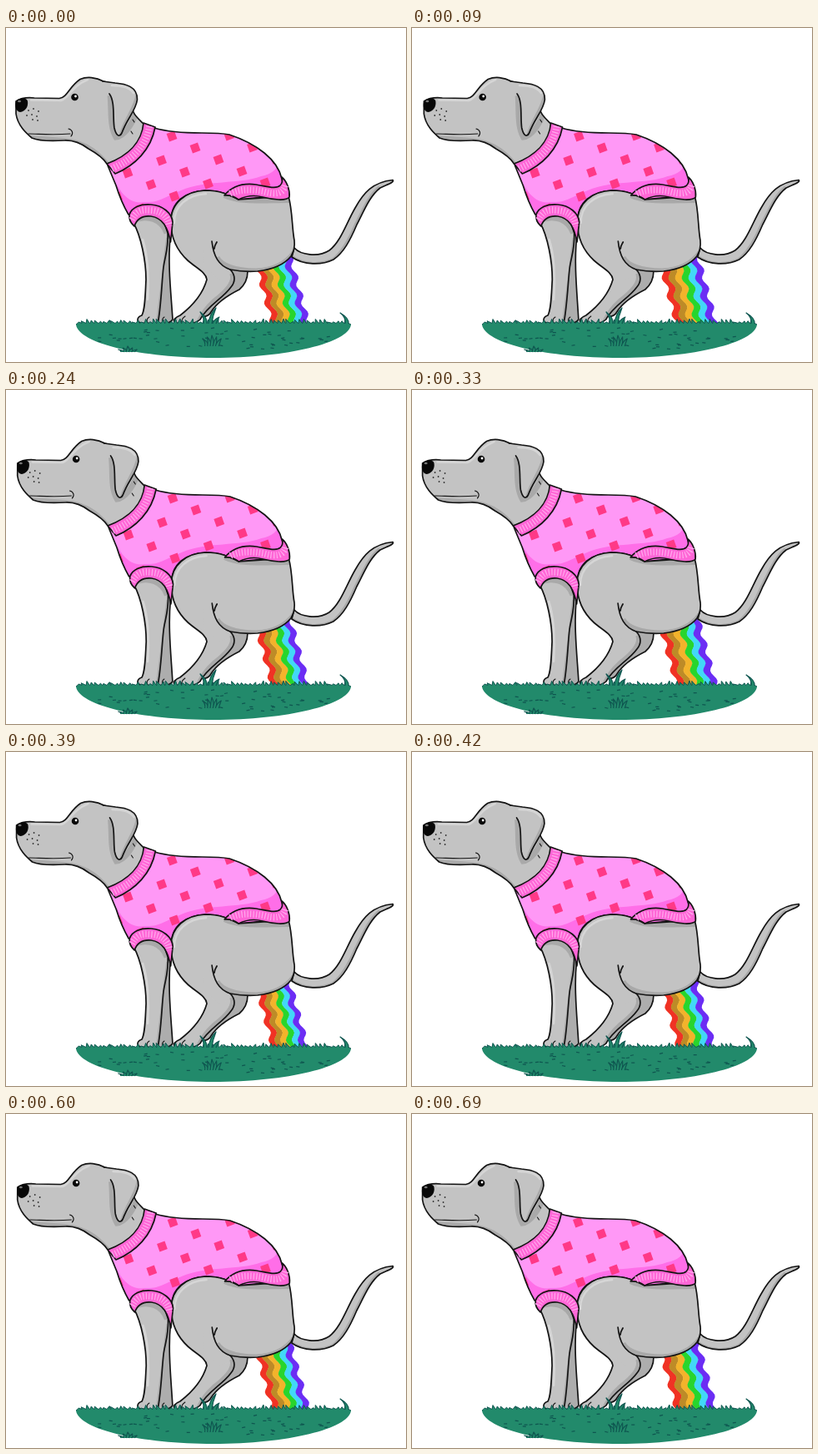
Recreate the animation shown at these times as an HTML page. Size 480 by 401 pixels, loop 720 ms.

```html
<!DOCTYPE html>
<html lang="en">
<head>
<meta charset="utf-8">
<title>Rainbow dog</title>
<style>
html, body { margin: 0; width: 100%; height: 100%; overflow: hidden; background: #fff; }
svg { display: block; width: 100vw; height: 100vh; }
.ink { stroke: #141414; stroke-width: 1.7; stroke-linecap: round; stroke-linejoin: round; }
.thin { stroke-width: 1.1; }
.line { fill: none; }
.fur { fill: #c3c3c3; }
.far { fill: #adadad; }
.shade { fill: none; stroke: #a9a9a9; }
.glow { fill: none; stroke: #d6d6d6; stroke-width: 2.5; stroke-linecap: round; }
.band { fill: #ff66d6; }
.rib { fill: none; stroke: #ffa9ee; stroke-width: 8; stroke-dasharray: 1.2 2.3; }
</style>
</head>
<body>
<svg viewBox="0 0 480 401" preserveAspectRatio="none">
  <defs>
    <path id="tail" d="M346 264C353 272 374 276 388 267C402 256 408 235 419 216C429 198 440 185 464 182.500C467 185 457 188 449 192C436 202 429 221 421 236C413 255 405 270 393 278C379 285 357 285 343 275Z"/>
    <path id="head" d="M12 88C18 84 25 83 34 84L64 84.500C74 83 75 71 89 61.500C97 58 108 59 117 64L140 70L153 101C155 106 160 110 165 115L166 140L130 172L121 163C116 155 108 150 99 145C91 139 82 134.500 70 135C54 136 38 135 31 132C24 126 14 117 12 103Z"/>
    <path id="ear" d="M124 79C131 88 128 108 130 120C132 129 136 132 139 126C145 109 156 99 157.500 86C158 70 143 67 131 66L116 64Z"/>
    <path id="leg" d="M153 234C162 250 168 280 168 302C167 321 167 338 163 345C157 347 156 353 162 354L182 355C186 338 187 303 189 287C191 273 195 265 194 246L188 228L160 222Z"/>
    <path id="haunch" d="M198 234C197 210 216 196 239 195C257 195 267 200 279 206L339 202C344 220 343 240 346 255C347 264 345 269 342 274C334 284 319 290 302 292C290 293 279 292 269 290C276 297 275 305 270 311C260 325 241 334 233 350C227 356 211 355 203 354C199 351 204 347 209 345C222 335 236 320 241 302C240 293 228 288 218 279C204 266 198 250 198 234Z"/>
    <path id="vest" d="M178 120C195 125 213 126 235 126C248 126 258 126 268 128C301 139 326 158 331 181L336 200L279 206C267 200 257 195 239 195C216 196 197 208 198 234L190 220L147 224C140 212 136 202 132 189L122 165C149 156 170 142 178 120Z"/>
    <clipPath id="tailClip"><use href="#tail"/></clipPath>
    <clipPath id="headClip"><use href="#head"/></clipPath>
    <clipPath id="earClip"><use href="#ear"/></clipPath>
    <clipPath id="legClip"><use href="#leg"/></clipPath>
    <clipPath id="haunchClip"><use href="#haunch"/></clipPath>
    <clipPath id="vestClip"><use href="#vest"/></clipPath>
  </defs>

  <g id="rainbow"></g>

  <g id="dog">
    <use href="#tail" class="fur"/>
    <g clip-path="url(#tailClip)">
      <path class="shade" stroke-width="6" d="M343 276C357 286 379 286 393 279C405 270 413 255 421 236C429 221 436 202 449 192"/>
    </g>
    <use href="#tail" class="ink line"/>

    <path class="ink far" d="M262 288L290 292C290 302 287 308 280 314C268 320 254 328 246 341C243 347 236 347 232 346L240 325Z"/>
    <path class="ink far" d="M188 228L197 252C194 284 198 318 200 350C197 355 187 355 180 354Z"/>

    <use href="#leg" class="fur"/>
    <g clip-path="url(#legClip)">
      <path class="shade" stroke-width="9" d="M152 230C170 222 188 229 194 246"/>
      <path class="shade" stroke-width="4" d="M194 252C190 285 187 315 182 354"/>
      <path class="glow" d="M164 254C170 272 172 300 170 326"/>
    </g>
    <use href="#leg" class="ink line"/>
    <path class="ink line thin" d="M170 354C168 350 170 348 172 347M188 354C187 350 188 348 190 347"/>

    <use href="#head" class="fur"/>
    <g clip-path="url(#headClip)">
      <path class="shade" stroke-width="8" d="M28 133L70 136C99 139 112 154 123 167"/>
      <path class="shade" stroke-width="7" d="M125 81C127 99 124 117 132 131C141 130 151 117 156 102"/>
      <path class="glow" d="M30 86.500L66 87C76 84 78 70 98 62"/>
    </g>
    <use href="#head" class="ink line"/>
    <use href="#ear" class="fur"/>
    <g clip-path="url(#earClip)">
      <path class="shade" stroke-width="7" d="M159 80C157 96 145 109 139 129"/>
      <path class="glow" d="M127 69C140 69 149 72 153 78"/>
    </g>
    <path class="ink line" d="M124 79C131 88 128 108 130 120C132 129 136 132 139 126C145 109 156 99 157.500 86C158 70 143 67 131 66L116 64"/>
    <path class="ink line thin" d="M27 127C39 127 54 129 77 127M75 121C80 122 81 127 78 130"/>
    <path class="ink line thin" d="M152 110L154 113M150 124L152 127"/>
    <path d="M12 88C16 83 25 83 26 88C27 95 23 100 17 101C12 100 10 94 12 88Z" fill="#080808"/>
    <ellipse cx="16" cy="88" rx="2" ry="1.200" fill="#777"/>
    <circle cx="82.500" cy="83" r="4.300" fill="#080808"/>
    <circle cx="83.500" cy="82" r="1.400" fill="#fff"/>
    <g id="freckles" fill="#333"></g>

    <use href="#vest" fill="#ff98f6"/>
    <g clip-path="url(#vestClip)">
      <path d="M124 172C137 199 148 212 166 209C184 210 190 203 210 195C240 182 280 188 306 178C322 175 329 166 325 157L345 205L190 240L135 230Z" fill="#ff6ee8"/>
      <g id="checks" fill="#ff3987"></g>
    </g>
    <use href="#vest" class="ink line"/>

    <use href="#haunch" class="fur"/>
    <g clip-path="url(#haunchClip)">
      <path class="shade" stroke-width="6" d="M262 201C280 210 310 207 340 207"/>
      <path class="shade" stroke-width="9" d="M252 276C257 286 274 293 300 293C322 292 337 284 347 270"/>
      <path class="shade" stroke-width="8" d="M272 294C277 306 264 318 250 329C240 338 236 345 232 354"/>
      <path class="glow" d="M202 234C201 214 218 200 240 199"/>
    </g>
    <path class="fur" d="M249 262C251 279 261 286 270 291C269 298 262 301 255 302L238 286L236 262Z"/>
    <use href="#haunch" class="ink line"/>
    <path class="ink line" d="M247 256C249 274 255 285 269 290M250 265C250 261 252 259 253 257"/>
    <path class="ink line thin" d="M211 354C210 350 212 348 215 346"/>

    <path class="ink band" d="M165 114L179 119C174 146 155 165 131 175L121 163C145 154 163 138 165 114Z"/>
    <path class="rib" d="M172 118C168 143 151 158 127 169"/>
    <path class="ink band" d="M148 224C151 215 162 211 174 212C188 213 199 222 200 233L197.500 257C194 239 188 228 174 226C164 225 157 229 154 238Q147 232 148 224Z"/>
    <path class="rib" d="M151 230C157 218 164 218 175 219C187 220 194 226 196 238"/>
    <path class="ink band" d="M262 201C272 189 285 186 300 188C313 190 324 194 329 189C332 186 332 183 331 179C336 183 341 193 340 203C336 208 320 206 308 203C297 200 287 202 279 206Q271 200 262 201Z"/>
    <path class="rib" d="M269 199C281 193 295 194 308 196C322 200 333 200 335 188"/>
  </g>

  <g id="lawn"></g>
</svg>
<script>
const $ = id => document.getElementById(id);
const add = (parent, tag, attrs) => {
  const el = document.createElementNS('http://www.w3.org/2000/svg', tag);
  for (const key in attrs) el.setAttribute(key, attrs[key]);
  return parent.appendChild(el);
};

let seed = 11;
const rand = () => (seed = seed * 16807 % 2147483647) / 2147483647;

for (const [x, y] of [[27, 99], [33, 97], [39, 100], [25, 105], [31, 104], [37, 106], [32, 110], [38, 111]])
  add($('freckles'), 'circle', { cx: x, cy: y, r: 0.9 });

// Slanted lattice of squares, clipped to the vest
for (let i = -1; i < 5; i++) for (let j = -1; j < 4; j++) {
  const x = 199 + 28 * i - 12.5 * j, y = 130 + 14 * i + 29 * j;
  add($('checks'), 'rect', { x: x - 5, y: y - 5, width: 10, height: 10, transform: `rotate(-20 ${x} ${y})` });
}

// Lawn: a half-oval with a ragged, outlined top, tufts and small flecks
const lawn = $('lawn'), GREEN = '#228a6b', DARK = '#0f5650';
let rim = 'M84 356';
for (let x = 86; x < 410; x += 5) {
  const h = 1 + rand() * 4;
  rim += `L${x} 354.5L${x + rand() * 5 - 1} ${354 - h}L${x + 4} 354`;
}
rim += 'L414 356';
add(lawn, 'path', { d: rim + 'C412 378 337 396 249 396C163 396 87 379 84 356Z', fill: GREEN });
add(lawn, 'path', { d: rim, fill: 'none', stroke: DARK, 'stroke-width': 1, 'stroke-linejoin': 'round' });

const blade = (x, y, dx, h) => add(lawn, 'path', {
  d: `M${x - 2} ${y}Q${x - 1} ${y - h * 0.6} ${x + dx} ${y - h}Q${x + 3} ${y - h * 0.5} ${x + 2} ${y}`,
  fill: GREEN, stroke: DARK, 'stroke-width': 1.2, 'stroke-linejoin': 'round'
});
const tuft = (x, y, h) => [-8, -4, 0, 4, 8].forEach(d => blade(x + d * 0.8, y, d * 0.6, h - Math.abs(d) * 0.5));
tuft(247, 382, 13);
tuft(146, 389, 7);
blade(239, 355, -6, 14);
blade(245, 355, 7, 19);
blade(250, 355, 6, 8);
blade(409, 355, -8, 13);

for (let i = 0; i < 60; i++) {
  const a = rand() * 6.283, r = Math.sqrt(rand());
  const x = 249 + Math.cos(a) * r * 145, y = 373 + Math.sin(a) * r * 14;
  add(lawn, 'path', { d: `M${x} ${y}l4 ${rand() * 2 - 1}`, stroke: DARK, 'stroke-width': 1.2 });
}

const stripes = ['#f03224', '#bd8b27', '#f3b32b', '#28d52d', '#42d8f7', '#6b2df4']
  .map(fill => add($('rainbow'), 'path', { fill }));

const LOOP = 720, STEP = 30, BEAT = 180, FLOW = 144, WAVE = 22, TOP = 268, END = 355;
const wave = cycles => Math.cos(2 * Math.PI * cycles);

// Ripples run down the stripes while the whole stream narrows and widens
function drawRainbow(t) {
  const width = 46 - 4 * wave((t - 30) / BEAT);
  const edge = (i, y) => {
    const sway = 2.8 * wave((y - 335) / WAVE - (t - 240) / FLOW);
    return (323.5 + (i / 6 - 0.5) * width + (y - 290) * 0.27 + sway).toFixed(1);
  };
  stripes.forEach((stripe, i) => {
    const left = [], right = [];
    for (let y = TOP; y <= END; y += 3) {
      left.push(edge(i, y) + ' ' + y);
      right.unshift(edge(i + 1.05, y) + ' ' + y);
    }
    stripe.setAttribute('d', 'M' + left.concat(right).join('L') + 'Z');
  });
}

// The head trembles while paws and tail tip stay planted
function poseDog(t) {
  const s = 0.6 * (1 - wave(t / BEAT));
  $('dog').setAttribute('transform', `matrix(${1 - 0.0032 * s} 0 ${-0.0059 * s} 1 ${2.577 * s} 0)`);
}

const start = performance.now();
function run() {
  const t = Math.floor((performance.now() - start) % LOOP / STEP) * STEP;
  drawRainbow(t);
  poseDog(t);
  requestAnimationFrame(run);
}
run();
</script>
</body>
</html>
```
